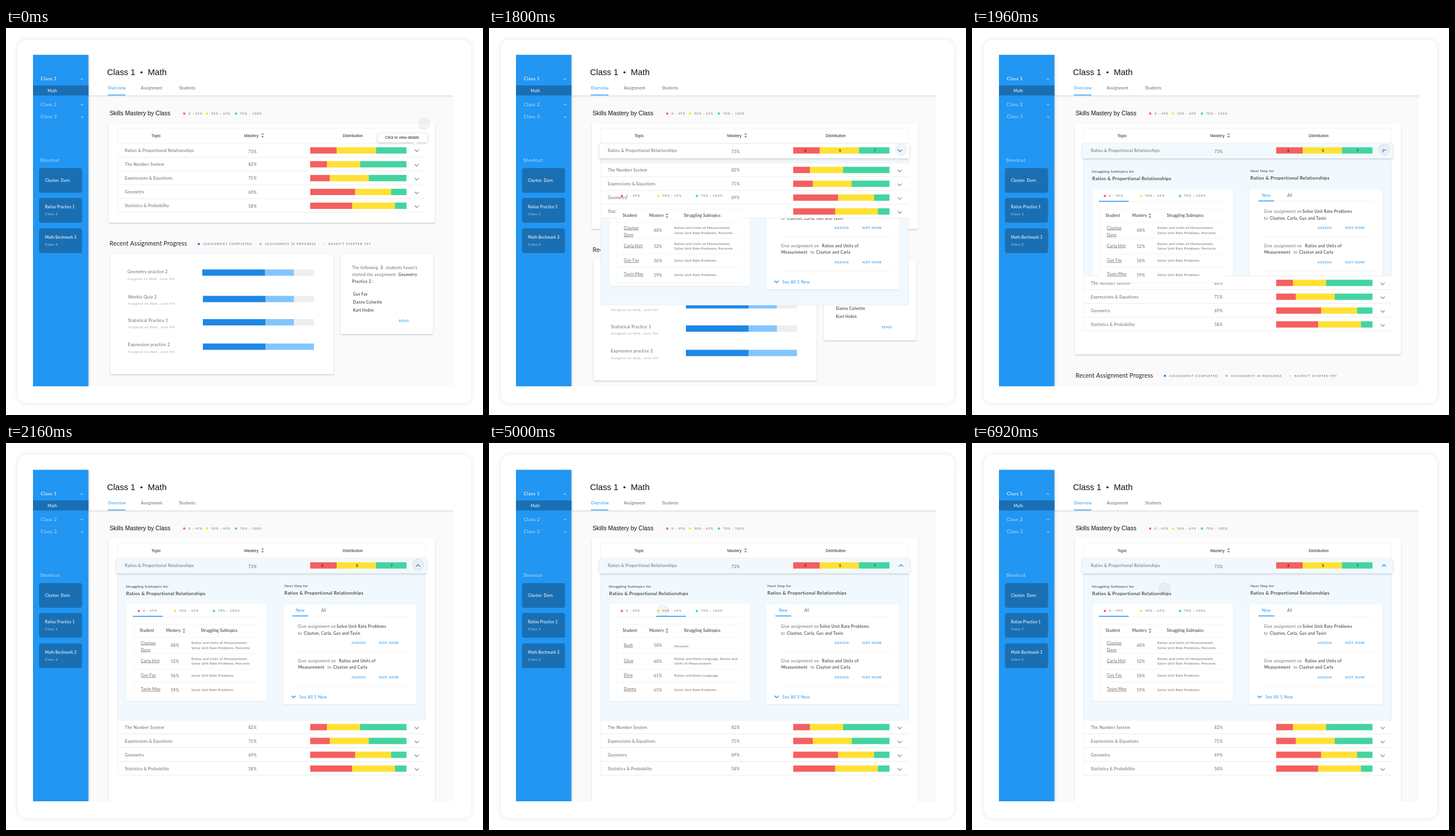
Write an HTML page with a canvas that moves like this. It is 831x674 px and loops after 6.96 s.

```html
<!DOCTYPE html>
<html lang="en">
<head>
<meta charset="utf-8">
<title>Class dashboard</title>
<style>
html, body { margin: 0; width: 100%; height: 100%; overflow: hidden; background: #fff; }
canvas { display: block; }
</style>
</head>
<body>
<canvas id="stage" width="831" height="674"></canvas>
<script>
const ctx = document.getElementById('stage').getContext('2d');
const LOOP = 6960, STEP = 40;
const BLUE = '#2196f3', NAVY = '#1a6fb3', DARK = '#333', MID = '#666', LINE = '#efefef', ICE = '#f1f9fe';
const RED = '#f55f5f', YELLOW = '#ffe135', GREEN = '#44d4a0', DONE = '#1e88e5', DOING = '#82c5fd';
const SANS = '"Liberation Sans", Arial, sans-serif';

// Standard CSS "ease" curve between two times
function ease(t, from, to) {
  const p = Math.min(1, Math.max(0, (t - from) / (to - from)));
  let lo = 0, hi = 1;
  for (let i = 0; i < 20; i++) {
    const s = (lo + hi) / 2;
    if (.75 * s * (1 - s) + s ** 3 < p) lo = s; else hi = s;
  }
  return p === 1 ? 1 : .3 * lo * (1 - lo) ** 2 + 3 * lo * lo * (1 - lo) + lo ** 3;
}

function faded(alpha, draw) {
  if (alpha <= 0) return;
  ctx.save();
  ctx.globalAlpha *= alpha;
  draw();
  ctx.restore();
}

function shifted(dy, draw) {
  ctx.save();
  ctx.translate(0, dy);
  draw();
  ctx.restore();
}

// Text is placed by its left edge (or centre) and the middle of its capitals
function text(s, x, y, size, color, gap = .3, { weight = 400, family = 'Lato, sans-serif', align = 'left', under } = {}) {
  ctx.font = `${weight} ${size}px ${family}`;
  ctx.letterSpacing = gap + 'px';
  ctx.textAlign = align;
  ctx.fillStyle = color;
  const base = y + size * .36;
  ctx.fillText(s, x, base);
  if (under) ctx.fillRect(x, base + 1, ctx.measureText(s).width - gap, .7);
}
const strong = (s, x, y, size, color = DARK, gap = .35) => text(s, x, y, size, color, gap, { weight: 500 });
const button = (s, x, y) => text(s, x, y, 6, BLUE, .65, { weight: 600 });

function rect(x1, y1, x2, y2, color) {
  ctx.fillStyle = color;
  ctx.fillRect(x1, y1, x2 - x1, y2 - y1);
}

function box(x1, y1, x2, y2, color, radius = 2, shadow = 0, blur = 3, drop = 1.2) {
  ctx.save();
  if (shadow) {
    ctx.shadowColor = `rgba(0,0,0,${shadow})`;
    ctx.shadowBlur = blur;
    ctx.shadowOffsetY = drop;
  }
  ctx.fillStyle = color;
  ctx.beginPath();
  ctx.roundRect(x1, y1, x2 - x1, y2 - y1, radius);
  ctx.fill();
  ctx.restore();
}

function dot(x, y, r, color) {
  ctx.fillStyle = color;
  ctx.beginPath();
  ctx.arc(x, y, r, 0, 7);
  ctx.fill();
}

function chevron(x, y, color, w = 3.5, turn = 0, weight = 1.4) {
  ctx.save();
  ctx.translate(x, y);
  ctx.rotate(turn);
  ctx.strokeStyle = color;
  ctx.lineWidth = weight;
  ctx.beginPath();
  ctx.moveTo(-w, -w / 2);
  ctx.lineTo(0, w / 2);
  ctx.lineTo(w, -w / 2);
  ctx.stroke();
  ctx.restore();
}

function sortIcon(x, y) {
  ctx.fillStyle = '#999';
  for (const d of [-1, 1]) {
    ctx.beginPath();
    ctx.moveTo(x - 2.5, y + d);
    ctx.lineTo(x + 2.5, y + d);
    ctx.lineTo(x, y + d * 4.5);
    ctx.fill();
  }
}

// Consecutive colour segments between the given edges
function bar(y, edges, colors) {
  colors.forEach((c, i) => rect(edges[i], y - 5.5, edges[i + 1], y + 5.5, c));
}

function legend(y, xs, labels, colors) {
  xs.forEach((x, i) => {
    dot(x, y, 2, colors[i]);
    text(labels[i], x + 7.4, y, 5.2, MID, 1);
  });
}
const scores = (y, xs) => legend(y, xs, ['0 - 49%', '50% - 69%', '70% - 100%'], [RED, YELLOW, GREEN]);

function sidebar() {
  box(47, 46.5, 143.5, 624, BLUE, 0, .25, 4, 0);
  rect(47, 100, 143.5, 117.5, NAVY);
  strong('Class 1', 60.5, 88, 8.2, '#fff', .4);
  text('Math', 72.5, 110, 6.8, '#fff', .15);
  const pale = 'rgba(255,255,255,.72)';
  text('Class 2', 60.5, 133, 8.2, pale, .4);
  text('Class 3', 60.5, 154.5, 8.2, pale, .4);
  text('Shortcut', 59.5, 230.5, 8.2, pale, .35);
  chevron(132, 89, '#fff', 2.3, Math.PI, .8);
  chevron(132.5, 133.5, '#fff', 2.3, 0, .8);
  chevron(133, 155, '#fff', 2.3, 0, .8);
  for (const y of [244, 296, 349]) box(57.5, y, 132.5, y + 43, NAVY, 4);
  strong('Clayton  Dorn', 68, 265.5, 6.6, '#fff', .2);
  strong('Ratios Practice 1', 68, 312, 6.6, '#fff', .2);
  text('Class 1', 68, 323.5, 6.3, pale, .4);
  strong('Math Bechmark 3', 68, 364.5, 6.6, '#fff', .2);
  text('Class 2', 68, 376.5, 6.3, pale, .4);
}

function header() {
  box(144, 46.5, 779, 117.5, '#fff', 0, .13, 2, 1);
  text('Class 1', 176, 76.8, 14.8, '#111', 0, { family: SANS });
  dot(236, 77.3, 1.8, '#111');
  text('Math', 247, 76.8, 14.8, '#111', 0, { family: SANS });
  text('Overview', 177.5, 104, 7, BLUE, .17);
  text('Assignment', 235, 104, 7, MID, .17);
  text('Students', 301.5, 104, 7, MID, .17);
  rect(177.5, 116, 208, 117.3, BLUE);
}

function assignments() {
  text('Recent Assignment Progress', 180.5, 375.5, 10.6, '#222', .13);
  legend(376.3, [336, 443.5, 554], ['ASSIGNMENT COMPLETED', 'ASSIGNMENT IN PROGRESS', "HAVEN'T STARTED YET"], [DONE, DOING, '#e8e8e8']);
  box(182, 394, 571, 603, '#fff', 2, .2, 2.5);
  const rows = [['Geometry practice 2', 424, 426], ['Weekly Quiz 2', 468, 472], ['Statistical Practice 1', 509, 512.5], ['Expression practice 2', 551.5, 555]];
  rows.forEach(([name, y, barY], i) => {
    const x = i ? 212.5 : 211.5;
    text(name, x, y, 7.2, MID, .3);
    text('Assigned on Wed., June 9th', x, y + (i % 3 ? 11.5 : 12.5), 6, '#aaa', .36);
    bar(barY, [i ? 343 : 342, i ? 452 : 451, i < 3 ? 501.7 : 536.5, 536.5], [DONE, DOING, '#eee']);
  });

  box(583, 394, 744, 533, '#fff', 2, .2, 2.5);
  text('The following', 603, 417.5, 6.8, MID, .38);
  strong('3', 652.5, 417.5, 6.8);
  text("students haven't", 661.5, 417.5, 6.8, MID, .38);
  text('started the assignment', 603, 429.5, 6.8, MID, .38);
  strong('Geometry', 683.5, 429.5, 6.8);
  strong('Practice 2 :', 603, 441.5, 6.8);
  ['Gus Fay', 'Danny Colvette', 'Kurt Hobin'].forEach((s, i) => strong(s, 604.5, 464 + i * 14, 6.8, DARK, .3));
  button('SEND', 684, 509.7);
}

const topics = [
  ['Ratios & Proportional Relationships', '73%', 576, 644.5],
  ['The Number System', '82%', 559, 617],
  ['Expressions & Equations', '71%', 564, 632],
  ['Geometry', '69%', 608.5, 671],
  ['Statistics & Probability', '58%', 603, 677.5],
];

function topicRow(i) {
  const [name, mastery, a, b] = topics[i], y = 213.2 + i * 24.1;
  text(name, 207, y + .3, 7.2, MID, .27);
  text(mastery, 429.5, y + (i ? .5 : 1.8), 7, MID, .25, { align: 'center' });
  bar(y, [530, a, b, 697.7], [RED, YELLOW, GREEN]);
  if (i) chevron(715.5, y + 1.5, '#999');
}

function skillsTable() {
  ctx.strokeStyle = '#f3f3f3';
  ctx.lineWidth = 1;
  ctx.strokeRect(194.5, 174.5, 536, 27);
  text('Topic', 261.5, 187, 7, '#222', 0, { family: SANS, align: 'center' });
  text('Mastery', 415, 187, 7, '#222', 0, { family: SANS });
  sortIcon(447, 187);
  text('Distribution', 604, 187, 7, '#222', 0, { family: SANS, align: 'center' });
}

function lowerRows() {
  rect(194, 225, 731, 321, '#fff');
  for (let i = 1; i < 5; i++) topicRow(i);
  for (let i = 0; i < 5; i++) rect(194, 224.7 + i * 24, 731, 225.5 + i * 24, '#e8e8e8');
  rect(194, 225, 194.7, 321, LINE);
}

function firstRow(hover, open, numbers) {
  faded(hover, () => {
    box(192.5, 201.5, 732.5, 227, '#fff', 1, .2, 4, 1);
    faded(open, () => box(192.5, 201.5, 732.5, 227, ICE, 1));
  });
  topicRow(0);
  faded(numbers, () => ['4', '9', '7'].forEach((n, i) =>
    text(n, [551, 611.5, 672][i], 213.3, 7, '#222', 0, { family: SANS, align: 'center' })));
  const x = 715.5 + 2.3 * open;
  faded(1 - hover, () => chevron(x, 213.5, '#999'));
  faded(hover, () => chevron(x, 213.5, BLUE, 3.5, Math.PI * open, 1.5));
}

function tooltip() {
  box(647.5, 183.5, 734, 199, '#fff', 2, .25, 4, 1);
  ctx.fillStyle = '#fff';
  ctx.beginPath();
  ctx.moveTo(708, 198.5);
  ctx.lineTo(717, 198.5);
  ctx.lineTo(712.5, 203);
  ctx.fill();
  text('Click to view details', 690, 191, 6.8, '#222', 0, { family: SANS, align: 'center' });
}

function panel(tab) {
  rect(194, 227, 731, 483, '#dcebf6');
  rect(194.7, 227, 730.3, 482.4, ICE);
  text('Struggling Subtopics for', 208.5, 249.3, 6.5, DARK, .26);
  strong(topics[0][0], 209.5, 262.5, 8.2, '#222', .31);
  text('Next Step for', 485, 249, 6.5, DARK, .26);
  strong(topics[0][0], 485, 261.3, 8.2, '#222', .31);

  box(210, 280, 454.5, 449, '#fff', 2, .05);
  rect(221, 301.8, 441, 302.5, LINE);
  rect(221 + 70 * tab, 301, 273 + 70 * tab, 302.5, BLUE);

  box(483, 281, 715, 455, '#fff', 2, .08);
  text('New', 505, 291, 7, BLUE);
  text('All', 549, 291, 7, MID);
  rect(499, 301.2, 702, 301.9, LINE);
  rect(499, 300.5, 526.5, 301.9, BLUE);
  text('Give assignment on', 508.5, 320, 6.9, MID, .4);
  strong('Solve Unit Rate Problems', 576, 320, 6.9, DARK, .4);
  text('to', 508.5, 331.5, 6.9, MID, .4);
  strong('Clayton, Carla, Gus and Tavin', 519, 331.5, 6.9);
  text('Give assignment on', 508.5, 379.3, 6.9, MID, .4);
  strong('Ratios and Units of', 580, 379.3, 6.9);
  strong('Measurement', 509, 391, 6.9);
  text('to', 560, 391, 6.9, MID, .4);
  strong('Clayton and Carla', 570, 391, 6.9);
  for (const y of [348.3, 408]) {
    button('ASSIGN', 602, y);
    button('NOT NOW', 650, y);
    rect(508, y + 15.3, 702, y + 16, LINE);
  }
  chevron(501, 442, BLUE, 3.5, 0, 1.5);
  text('See All 5 New', 511, 442, 7, BLUE, .4);
}

const MEASURE = ['Ratios and Units of Measurement,', 'Solve Unit Rate Problems, Percents'];
const SOLVE = ['Solve Unit Rate Problems'];
const groups = [
  [[['Clayton', 'Dorn'], '48%', MEASURE], [['Carla Hirt'], '52%', MEASURE], [['Gus Fay'], '56%', SOLVE], [['Tavin Moy'], '59%', SOLVE]],
  [[['Ruth'], '58%', ['Percents']], [['Clive'], '60%', ['Ratios and Ratio Language, Ratios and', 'Units of Measurement']],
   [['Elsie'], '61%', ['Ratios and Ratio Language']], [['Danny'], '65%', SOLVE]],
];

function students(group) {
  group.forEach(([names, score, notes], i) => {
    const y = [352.5, 380, 405.3, 430.3][i];
    const top = names.length > 1 ? y - 4.5 : y - [.5, 1, .8, 2][i];
    names.forEach((n, k) => text(n, 235, top + k * 12, 7, MID, .33, { under: true }));
    text(score, 294.3, y, 7, MID, .25, { align: 'center' });
    notes.forEach((n, k) => text(n, 323, notes.length > 1 ? y - 4.4 + k * 8.5 : y + (i ? 0 : 1.5), 5.9, MID, .33));
  });
}

function studentTable(tab) {
  scores(292.5, [231.5, 294.7, 362.2]);
  rect(221, 316, 441, 443, '#fff');
  for (const y of [315.5, 338.5, 366, 393.5, 416, 443]) rect(221, y, 441, y + .7, LINE);
  rect(221, 316, 221.7, 443, '#f3f3f3');
  strong('Student', 233, 326.7, 6.7, DARK, .25);
  strong('Mastery', 279, 326.7, 6.7, DARK, .2);
  sortIcon(310, 327);
  strong('Struggling Subtopics', 339.5, 326.3, 6.7, DARK, .2);
  faded(1 - tab, () => students(groups[0]));
  faded(tab, () => students(groups[1]));
}

const moves = [[0, 720, 718, 211.7], [3140, 3760, 319.5, 291.7], [4844, 5734, 252, 293], [6833, 7433, 728, 67]];
const presses = [[1680, 1800], [4040, 4280], [5880, 6080]];

function cursor(t) {
  let x = 728.5, y = 166.5;
  for (const [from, to, tx, ty] of moves) {
    const p = ease(t, from, to);
    x += (tx - x) * p;
    y += (ty - y) * p;
  }
  const pressed = presses.some(([a, b]) => t >= a && t < b);
  dot(x, y, 9.7, `rgba(110,110,110,${pressed ? .16 : .08})`);
  ctx.strokeStyle = 'rgba(0,0,0,.1)';
  ctx.lineWidth = .8;
  ctx.stroke();
}

function draw(t) {
  const numbers = ease(t, 360, 720);
  const hover = ease(t, 740, 1100);
  const open = ease(t, 1780, 2140);
  const tab = ease(t, 4450, 4830) - ease(t, 6060, 6500);

  rect(0, 0, 831, 674, '#fff');
  box(20.5, 20.5, 810.5, 653.5, '#fff', 15, .11, 9, 0);
  ctx.save();
  ctx.beginPath();
  ctx.rect(47, 46.5, 732, 577.5);
  ctx.clip();
  rect(144, 46, 779, 624, '#fafafa');
  header();
  text('Skills Mastery by Class', 180.5, 148.3, 10.3, '#111', 0, { family: SANS });
  scores(149, [310.5, 350, 400.5]);
  shifted(286 * open, assignments);
  box(179, 166, 747.5, 339 + 286 * open, '#fff', 2, .18, 2.5, 1.5);
  skillsTable();
  if (open > 0) panel(tab);
  shifted(257.5 * open, lowerRows);
  if (open > 0) studentTable(tab);
  firstRow(hover, open, numbers);
  faded(1 - hover, tooltip);
  sidebar();
  cursor(t);
  ctx.restore();
}

// The picture advances in 40 ms steps
const start = performance.now();
function tick() {
  const t = Math.floor((performance.now() - start) / STEP + .1) * STEP;
  draw(t % LOOP);
  requestAnimationFrame(tick);
}
tick();
</script>
</body>
</html>
```
